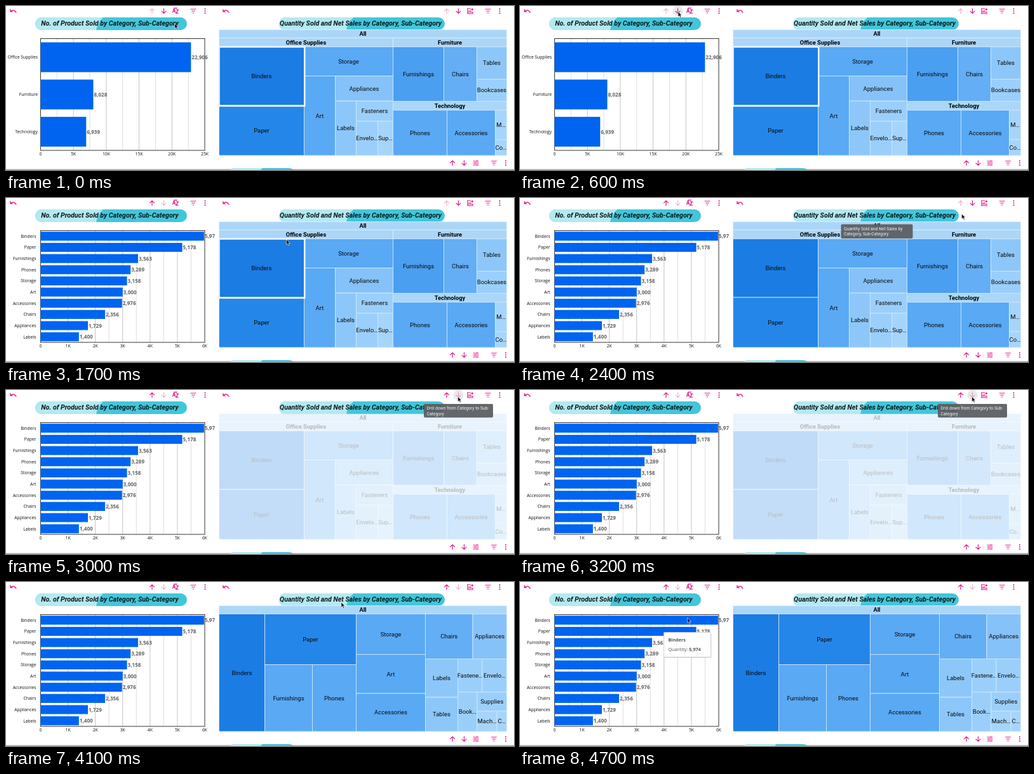
An HTML page that plays this animation: 800 by 259 pixels, repeating every 4.8 s.

```html
<!DOCTYPE html>
<html lang="en">
<head>
<meta charset="utf-8">
<title>Drill down dashboard</title>
<style>
  html, body { margin: 0; width: 100%; height: 100%; overflow: hidden; background: #fff; }
  svg { display: block; width: 100%; height: 100%; }
  text { font-family: Roboto, sans-serif; }
  .axis { font: 6.8px "Open Sans", sans-serif; fill: #111; }
  .value { font: bold 8.1px "Open Sans", sans-serif; fill: #666; }
  .title { font: italic bold 10.6px Roboto, sans-serif; fill: #0c1a20; }
  .cell { font-size: 9.5px; fill: #0a0a0a; }
  .head { font-size: 9.3px; font-weight: bold; fill: #000; }
  .tip { font-size: 6.8px; fill: #f1f1f1; }
  .card { font: 7.2px "Open Sans", sans-serif; fill: #555; }
  .icon { fill: none; stroke: #e0128f; stroke-width: 1.2; }
  .solid { fill: #e0128f; stroke: none; }
</style>
</head>
<body>
<svg id="stage" viewBox="0 0 800 259"></svg>
<script>
const LOOP = 4800, STEP = 100;
const stage = document.getElementById('stage');

function el(parent, tag, attrs = {}, text) {
  const node = document.createElementNS('http://www.w3.org/2000/svg', tag);
  for (const key in attrs) node.setAttribute(key, attrs[key]);
  if (text !== undefined) node.textContent = text;
  parent.appendChild(node);
  return node;
}
const group = (parent, attrs) => el(parent, 'g', attrs);
const rect = (parent, x, y, width, height, attrs) =>
  el(parent, 'rect', { x, y, width, height, ...attrs });
const label = (parent, x, y, text, cls, anchor = 'middle') =>
  el(parent, 'text', { x, y, class: cls, 'text-anchor': anchor }, text);
const show = (node, on) => node.setAttribute('visibility', on ? 'visible' : 'hidden');
const fade = (node, opacity) => node.setAttribute('opacity', opacity);

// Title pills
function pill(x, y, w, split, text) {
  rect(stage, x, y, w, 20, { rx: 10, fill: '#43c6d9' });
  el(stage, 'path', {
    d: `M${x + 10} ${y}H${split + 4}Q${split - 5} ${y + 8} ${split - 7} ${y + 20}H${x + 10}a10 10 0 0 1 0-20z`,
    fill: '#b4e9ef'
  });
  if (text) label(stage, x + w / 2 - 2, y + 13, text, 'title');
}

// Toolbar icons, centred on 0,0
const ICONS = {
  up: 'M0 4.2V-3.6M-3.8 .2L0-3.6L3.8 .2',
  down: 'M0-4.2V3.6M-3.8-.2L0 3.6L3.8-.2',
  undo: 'M-4.6-3V.8H-.8M-4.4 .6Q.6-4.2 4.8 2.6',
  filter: 'M-4.4-3H4.4M-2.8 0H2.8M-1.2 3H1.2',
  sort: 'M-4.6 2.6L-2.4-3.8L-.2 2.6M-3.9 .6H-.9M.8-2.2H4.2L.8 3.4H4.6M-2-4.6H3',
  chart: 'M1-4H-4V4H4V1M-2 2.4V-.6M0 2.4V-1.8M2 2.4V.4M3.2-4.6V-.8M1.3-2.7H5.1',
  sliders: 'M-4.5-3H.5M2.6-3H4.5M1.6-4.4V-1.6M-4.5 0H-2.4M-.4 0H4.5M-1.4-1.4V1.4M-4.5 3H1M3 3H4.5M2 1.6V4.4'
};
function icon(name, x, y) {
  const g = group(stage, { transform: `translate(${x} ${y})` });
  if (name === 'dots') {
    for (const cy of [-3.4, 0, 3.4]) el(g, 'circle', { cy, r: 1.05, class: 'solid' });
  } else el(g, 'path', { d: ICONS[name], class: 'icon' });
  return g;
}
const halo = x => el(stage, 'circle', { cx: x, cy: 8, r: 8, fill: '#e9e9e9' });

// Bar chart
const PLOT = { x: 54.5, y: 51.5, w: 258.5, h: 176.5 };
function barChart(rows, max, tick, right) {
  const g = group(stage);
  const at = v => PLOT.x + v / max * PLOT.w;
  const bottom = PLOT.y + PLOT.h;
  for (let v = tick / 2, minor = true; v < max; v += tick / 2, minor = !minor)
    el(g, 'path', { d: `M${at(v)} ${PLOT.y}V${bottom}`, stroke: minor ? '#dedede' : '#c4c4c4', 'stroke-width': 1 });
  rect(g, PLOT.x, PLOT.y, PLOT.w, PLOT.h, { fill: 'none', stroke: '#333' });
  const band = PLOT.h / rows.length;
  rows.forEach(([name, value], i) => {
    const mid = PLOT.y + band * (i + .5);
    rect(g, PLOT.x, mid - band * .4, at(value) - PLOT.x, band * .8, { fill: '#0064f0' });
    label(g, right, mid + 2.5, name, 'axis', 'end');
    const text = value.toLocaleString('en-US');
    label(g, at(value) + 1, mid + 3, value === 5974 ? text.slice(0, 4) : text, 'value', 'start');
  });
  for (let v = 0; v <= max; v += tick)
    label(g, at(v), 235.5, v ? v / 1000 + 'K' : '0', 'axis');
  return g;
}

// Treemap
const SHADES = ['#1b7ce3', '#2586e9', '#4b9ff0', '#59a9f5', '#63aef5', '#85c2f9', '#8dc7fa', '#9bcffb', '#a6d5fb'];
function treemap(heads, cells) {
  const g = group(stage);
  for (const [name, x, y, r, b] of heads) {
    rect(g, x, y, r - x, b - y, { fill: '#abd6f8', stroke: '#e4f2fd', 'stroke-width': .8 });
    label(g, (x + r) / 2, (y + b) / 2 + 3.3, name, 'head');
  }
  for (const [name, x, y, r, b, shade] of cells) {
    rect(g, x, y, r - x, b - y, { fill: SHADES[shade], stroke: '#cfe7fc', 'stroke-width': .9 });
    label(g, (x + r) / 2, (y + b) / 2 + 3.4, name, 'cell');
  }
  return g;
}

const byCategory = [
  ['Binders', 335.5, 64.5, 469.5, 157, 0], ['Paper', 335.5, 157, 469.5, 236, 1],
  ['Storage', 469.5, 64.5, 609.5, 110.5, 3], ['Art', 469.5, 110.5, 518.5, 236, 3],
  ['Appliances', 518.5, 110.5, 609.5, 150, 5], ['Labels', 518.5, 150, 551.5, 236, 6],
  ['Fasteners', 551.5, 150, 609.5, 182, 7], ['Envelo…', 551.5, 182, 585.5, 236, 7],
  ['Sup…', 585.5, 182, 609.5, 236, 8], ['Furnishings', 609.5, 64.5, 689.5, 150.5, 2],
  ['Chairs', 689.5, 64.5, 741.5, 150.5, 4], ['Tables', 741.5, 64.5, 788.5, 115.5, 6],
  ['Bookcases', 741.5, 115.5, 788.5, 150.5, 7], ['Phones', 609.5, 164.5, 694.5, 236, 3],
  ['Accessories', 694.5, 164.5, 770.5, 236, 3], ['M…', 770.5, 164.5, 788.5, 211, 8],
  ['Co…', 770.5, 211, 788.5, 236, 8]
];
const bySub = [
  ['Binders', 335.5, 50.5, 407.5, 236, 0], ['Paper', 407.5, 50.5, 551.5, 130.5, 1],
  ['Furnishings', 407.5, 130.5, 482.5, 236, 3], ['Phones', 482.5, 130.5, 551.5, 236, 3],
  ['Storage', 551.5, 50.5, 660.5, 114.5, 3], ['Art', 551.5, 114.5, 660.5, 176, 3],
  ['Accessories', 551.5, 176, 660.5, 236, 3], ['Chairs', 660.5, 50.5, 735, 121.5, 4],
  ['Appliances', 735, 50.5, 788.5, 121.5, 5], ['Labels', 660.5, 121.5, 711.5, 182, 6],
  ['Tables', 660.5, 182, 711.5, 236, 6], ['Fastene…', 711.5, 121.5, 750, 174, 7],
  ['Envelo…', 750, 121.5, 788.5, 174, 7], ['Book…', 711.5, 174, 742, 236, 7],
  ['Supplies', 742, 174, 788.5, 204, 7], ['Mach…', 742, 204, 773, 236, 8],
  ['C…', 773, 204, 788.5, 236, 8]
];
const all = ['All', 335.5, 37.5, 788.5, 50.5];

function darkTip(x, y, w, h, lines) {
  const g = group(stage);
  rect(g, x, y, w, h, { rx: 2, fill: '#5c5f62', 'fill-opacity': .95 });
  lines.forEach((line, i) => label(g, x + 4.5, y + 9 + i * 8.6, line, 'tip', 'start'));
  return g;
}

// Build the scene
rect(stage, 0, 257.6, 800, 1.4, { fill: '#a9a9a9' });
pill(46, 18, 239, 149, 'No. of Product Sold by Category, Sub-Category');
pill(430, 18, 261, 543, 'Quantity Sold and Net Sales by Category, Sub-Category');
pill(350, 256, 106, 400);

const halos = [halo(248.5), halo(712.5)];
icon('undo', 11.5, 8);
icon('undo', 346.5, 8);
const arrows = [[230, 248.5], [694, 712.5]].map(([u, d]) => [icon('up', u, 8), icon('down', d, 8)]);
[['sort', 267, 8], ['filter', 295, 8], ['dots', 313.5, 8],
 ['chart', 731, 8], ['filter', 759, 8], ['dots', 777.5, 8],
 ['up', 703, 248], ['down', 721.5, 248], ['sliders', 740, 248], ['filter', 768.5, 248], ['dots', 787, 248]
].forEach(args => icon(...args));

const bars = [
  barChart([['Office Supplies', 22906], ['Furniture', 8028], ['Technology', 6939]], 25000, 5000, 50),
  barChart([['Binders', 5974], ['Paper', 5178], ['Furnishings', 3563], ['Phones', 3289], ['Storage', 3158],
    ['Art', 3000], ['Accessories', 2976], ['Chairs', 2356], ['Appliances', 1729], ['Labels', 1400]], 6000, 1000, 47.5)
];
const maps = [
  treemap([all, ['Office Supplies', 335.5, 50.5, 609.5, 64.5], ['Furniture', 609.5, 50.5, 788.5, 64.5],
    ['Technology', 609.5, 150.5, 788.5, 164.5]], byCategory),
  treemap([all], bySub)
];
const outline = rect(stage, 0, 0, 0, 0, { fill: 'none', stroke: '#eaf4fd', 'stroke-width': 2.6 });

const titleTip = darkTip(505.5, 41.5, 113, 22.5, ['Quantity Sold and Net Sales by', 'Category, Sub-Category']);
const drillTip = darkTip(658, 22, 109, 21.5, ['Drill down from Category to Sub-', 'Category']);

const card = group(stage);
rect(card, 227.5, 81, 74, 39, { rx: 1, fill: '#000', opacity: .12 });
rect(card, 226.5, 79.5, 74, 39, { rx: 1, fill: '#fff', stroke: '#ccc', 'stroke-width': .8 });
label(card, 233.5, 93.5, 'Binders', 'card', 'start').style.fontWeight = 'bold';
const amount = label(card, 233.5, 109, 'Quantity: ', 'card', 'start');
el(amount, 'tspan', { 'font-weight': 'bold' }, '5,974');

const cursor = el(stage, 'path', {
  d: 'M0 0V8.2L2 6.4L3.4 9.4L4.8 8.8L3.4 5.9H6z', fill: '#111', stroke: '#fff', 'stroke-width': .6
});

// Pointer path: time, x, y
const PATH = [
  [0, 265.5, 27.5], [500, 249, 9], [900, 249, 9], [1100, 251, 10.5], [1300, 285, 22], [1700, 441.5, 65.5],
  [1900, 480, 66], [2400, 695.5, 25], [2700, 711.5, 10.5], [3200, 711.5, 10.5], [3500, 699.5, 16],
  [3800, 699.5, 16], [4500, 263.5, 56.5], [4800, 263.5, 56.5]
];
function pointer(t) {
  const i = PATH.findIndex((p, n) => n && t <= p[0]);
  const [t0, x0, y0] = PATH[i - 1], [t1, x1, y1] = PATH[i];
  let k = (t - t0) / (t1 - t0);
  k = k * k * (3 - 2 * k);
  return [x0 + (x1 - x0) * k, y0 + (y1 - y0) * k];
}

function draw(t) {
  const between = (a, b) => t >= a && t < b;
  const drilled = [t >= 1000, t >= 2900];
  const barView = +drilled[0], mapView = +(t >= 3300);
  bars.forEach((g, i) => { show(g, i === barView); fade(g, between(1000, 1400) ? .4 : 1); });
  maps.forEach((g, i) => { show(g, i === mapView); fade(g, between(2900, 3300) ? .27 : 1); });
  arrows.forEach(([up, down], i) => {
    fade(up, drilled[i] ? 1 : .35);
    fade(down, drilled[i] ? .35 : 1);
  });
  show(halos[0], between(600, 1200));
  show(halos[1], between(2700, 3300));

  const [x, y] = pointer(t);
  cursor.setAttribute('transform', `translate(${x} ${y})`);
  const cells = mapView ? bySub : byCategory;
  const hit = t < 1800 ? cells[0] : cells.find(c => x > c[1] && x < c[3] && y > c[2] && y < c[4]);
  show(outline, !!hit);
  if (hit) {
    const [, l, top, r, b] = hit;
    Object.entries({ x: l, y: top, width: r - l + .8, height: b - top + .8 })
      .forEach(([k, v]) => outline.setAttribute(k, v));
  }
  show(titleTip, between(2300, 2600));
  show(drillTip, between(2800, 3300));
  show(card, t >= 4500);
}

const start = performance.now();
function tick() {
  const t = (performance.now() - start) % LOOP;
  draw(Math.floor(t / STEP) * STEP);
  requestAnimationFrame(tick);
}
draw(0);
requestAnimationFrame(tick);
</script>
</body>
</html>
```
